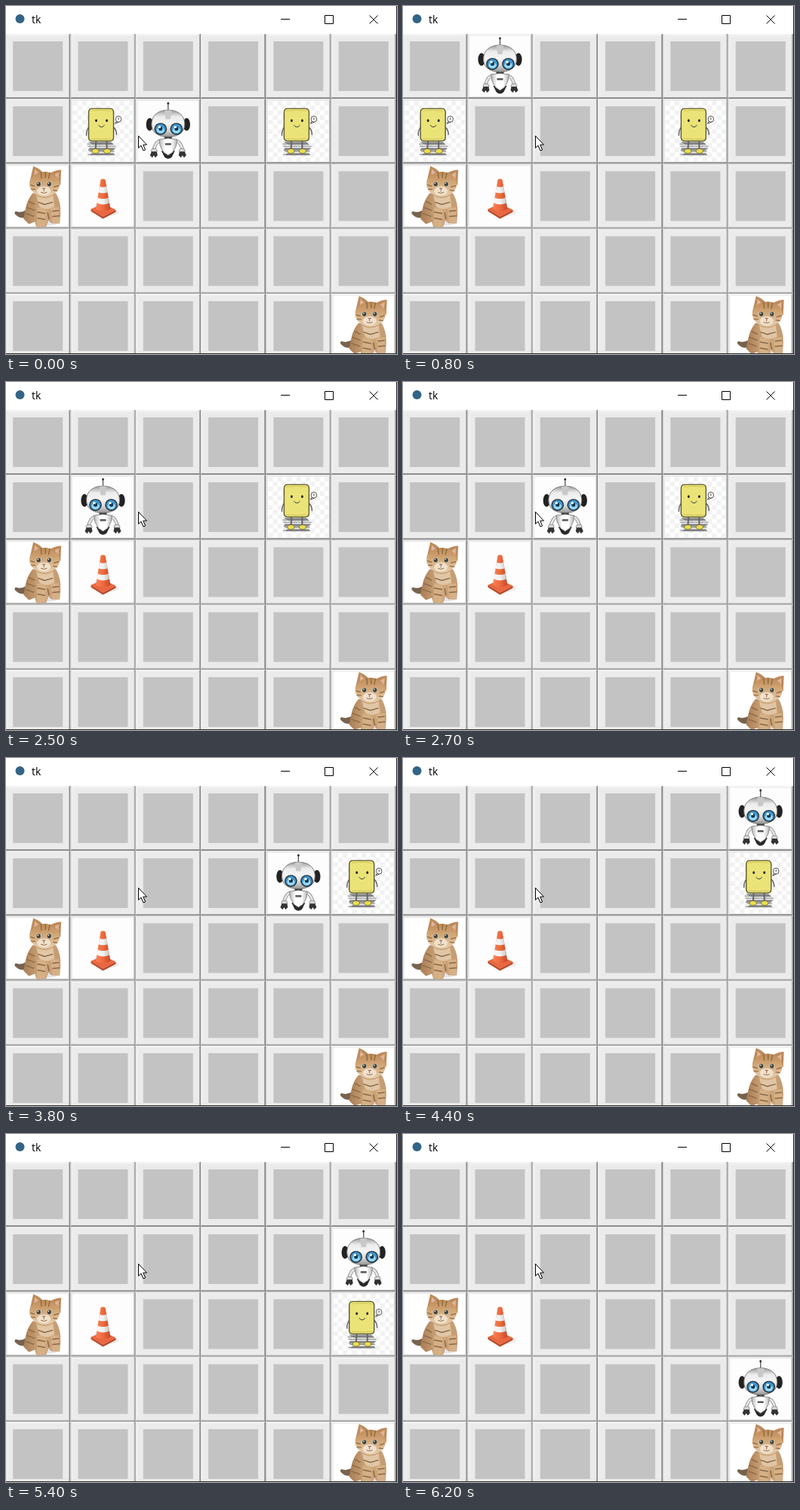
These frames come from a looping animation (518 px wide and 462 px high, 6300 ms). An HTML page with a canvas:

```html
<!DOCTYPE html>
<html lang="en">
<head>
<meta charset="utf-8">
<title>tk</title>
<style>
  html, body { margin: 0; width: 100%; height: 100%; overflow: hidden; background: #fff; }
  canvas { display: block; }
</style>
</head>
<body>
<canvas id="stage" width="518" height="462"></canvas>
<script>
const ctx = document.getElementById('stage').getContext('2d');
const LOOP = 6300, COLS = 6, ROWS = 5;
const cats = [[0, 2], [5, 4]], cone = [1, 2];
const STEPS = { L: [-1, 0], R: [1, 0], U: [0, -1], D: [0, 1] };
const moves = [
  [400, 'L'], [800, 'U'], [1300, 'L'], [1700, 'D'], [2200, 'R'], [2600, 'R'], [3100, 'R'],
  [3500, 'R'], [4000, 'U'], [4400, 'R'], [5000, 'D'], [5800, 'D'], [6200, 'D']
];
const same = (a, b) => a[0] === b[0] && a[1] === b[1];

// The robot pushes sponges; one pushed onto a cat disappears.
function stateAt(time) {
  let robot = [2, 1], sponges = [[1, 1], [4, 1]];
  for (const [when, key] of moves) {
    if (when > time) break;
    const step = pos => [pos[0] + STEPS[key][0], pos[1] + STEPS[key][1]];
    robot = step(robot);
    sponges = sponges.map(s => same(s, robot) ? step(s) : s)
                     .filter(s => !cats.some(c => same(c, s)));
  }
  return { robot, sponges };
}

function rect(color, x, y, w, h) {
  ctx.fillStyle = color;
  ctx.fillRect(x, y, w, h);
}
function shape(d, fill, stroke, width = 1) {
  const path = new Path2D(d);
  if (fill) { ctx.fillStyle = fill; ctx.fill(path); }
  if (stroke) { ctx.strokeStyle = stroke; ctx.lineWidth = width; ctx.stroke(path); }
}
function oval(x, y, rx, ry, fill, stroke, width = 1) {
  ctx.beginPath();
  ctx.ellipse(x, y, rx, ry, 0, 0, 7);
  ctx.fillStyle = fill;
  ctx.fill();
  if (stroke) { ctx.strokeStyle = stroke; ctx.lineWidth = width; ctx.stroke(); }
}
function gradient(x0, y0, x1, y1, ...colors) {
  const g = ctx.createLinearGradient(x0, y0, x1, y1);
  colors.forEach((c, i) => g.addColorStop(i / (colors.length - 1), c));
  return g;
}

function drawEmpty() {
  rect('#ebebeb', 0, 0, 81, 81);
  rect('#c3c3c3', 7, 7, 66, 66);
}

function drawRobot() {
  rect('#fdfdfd', 0, 0, 80, 80);
  shape('M40 12V4', null, '#555', 1.3);
  oval(40, 3, 1.4, 1.7, '#333');
  for (const side of [-1, 1]) {
    ctx.save();
    ctx.translate(40, 0);
    ctx.scale(side, 1);
    oval(24.5, 31, 4.6, 8.5, '#222');
    shape('M11 53Q16 54 19 64', null, '#888', 4.5);
    shape('M11 53Q16 54 19 64', null, '#e6e6e6', 2.8);
    oval(18.5, 66, 4, 3, '#d8d8d8', '#777', .7);
    shape('M15 67H22L24 72L21 75L19 72L17 75L14 72Z', '#333');
    ctx.restore();
  }
  shape('M35 46H45V52H35Z', '#3a3a3a');
  shape('M31 66H49L45 74Q40 79 35 74Z', '#292929');
  shape('M28 51Q40 48 52 51Q52 60 46 68L40 72L34 68Q28 60 28 51Z',
    gradient(28, 0, 52, 0, '#b5b5b5', '#fff', '#fff', '#b5b5b5'), '#777', .8);
  rect('#555', 36, 56, 8, 2.5);
  shape('M18 31C18 18 28 12 40 12S62 18 62 31C62 42 53 47.5 40 47.5S18 42 18 31Z',
    gradient(0, 12, 0, 47, '#999', '#ececec', '#f4f4f4', '#dadada', '#9a9a9a'), '#707070', .9);
  shape('M35 13Q40 11 45 13L43 24H37Z', '#c9c9c9');
  for (const x of [30, 51]) {
    oval(x, 37, 8.3, 8, '#27313a');
    oval(x, 37, 6.8, 6.6, '#3f95cd');
    oval(x, 38.8, 5, 4, '#9bdbf7');
    oval(x, 36.8, 2.6, 2.6, '#12344e');
    oval(x - 1.5, 34.5, 1.8, 1.6, '#fff');
  }
}

function drawSponge() {
  rect('#fff', 0, 0, 80, 80);
  for (let y = 0; y < 13; y++)
    for (let x = y % 2; x < 13; x += 2)
      rect('#f2f2f2', x * 6.2, y * 6.2, 6.2, 6.2);
  shape('M20 54H50L55 58H27ZM22 62H57L53 66H20ZM25 69H54L56 72H23Z', '#8c8c8c');
  shape('M19 57H53M20 60H57M22 67H55M20 71H52', null, '#777', 1);
  shape('M31 52L30 65M45 52V65', null, '#666', 2);
  for (const x of [30, 45.5]) oval(x, 66.5, 4.5, 3, '#ebdf50', '#6b652b', .8);
  shape('M21 35Q18 39 18 46M54 35Q58 38 58 45', null, '#666', 1.5);
  shape('M26 10H49Q54 10 54 15V48Q54 53 49 53H26Q21 53 21 48V15Q21 10 26 10Z',
    '#eae377', '#5d592f', 1.4);
  shape('M24 13Q37 11.5 51 13M24 50Q38 51 51 50', null, '#d2c85c', 1);
  oval(31, 26, 1.4, 1.8, '#222');
  oval(45, 26, 1.4, 1.8, '#222');
  shape('M34 32Q38 37 42 32', null, '#333', 1);
  oval(60.5, 24, 3.8, 4, '#fff', '#555', 1);
  shape('M58 27L56 30L61 28M60.5 22V25', null, '#444', 1);
}

function drawCat() {
  rect('#fff', 0, 0, 80, 80);
  oval(55, 74, 14, 5, '#e3e5e7');
  shape('M26 67Q18 72 10 64Q8 61 11 60Q17 63 25 58Z', '#77624e');
  shape('M33 36Q26 45 24 55L21 70L28 77L36 74L38 81H51L54 72L58 76H69L70 64Q71 48 64 36Z',
    gradient(20, 0, 70, 0, '#a67c54', '#cfa77c', '#c39b70'));
  shape('M38 39Q48 46 60 39L62 54Q51 60 42 54Z', '#e0c6a6');
  shape('M39 55L38 80H50L51 58ZM57 55L59 76H69L68 55Z', '#d5b087');
  shape('M28 47L36 51M25 55L36 59M24 63L35 67M40 48L49 51L60 48M39 61L50 63M39 69L50 71M59 60L68 59M59 67L69 66M53 62L55 71',
    null, '#8b6845', 1.5);
  shape('M29 22L34 0Q42 3 46 8L57 9Q64 5 71 5L70 25Z', '#bd8b5c');
  shape('M35 13L36 4L42 10ZM61 12L68 8L67 18Z', '#dfb59c');
  oval(49, 24, 20, 16.5, gradient(0, 7, 0, 40, '#bd8a57', '#d3a878', '#e6ceaf'));
  shape('M44 8L45 17M50 8V16M56 9L54 17M30 25L36 27M31 31L37 31M68 26L61 28M66 33L60 32',
    null, '#8f683f', 1.4);
  oval(48, 33, 9, 6, '#efe1cd');
  for (const x of [41, 55]) {
    oval(x, 24, 3.5, 3.3, '#e6d0ae');
    oval(x, 24, 2.7, 2.8, '#3c4644');
    oval(x - .8, 23, .8, .8, '#fff');
  }
  shape('M45.5 29H50.5L48 32Z', '#b27460');
  shape('M48 32V34M44 35Q48 37 52 35', null, '#8f6a4a', 1);
}

function drawCone() {
  rect('#fdfdfd', 0, 0, 80, 80);
  oval(47, 62, 14, 4, '#eeebe9');
  shape('M24 57L40 50L57 58L40 67Z', '#ea673f');
  shape('M24 57L40 67V70L24 60ZM40 67L57 58V61L40 70Z', '#bd4a2c');
  shape('M37 18Q40 16 43 18L50 57Q40 63 30.5 57Z',
    gradient(30, 0, 50, 0, '#f5845a', '#ee6b3e', '#c4482a'));
  shape('M35.5 27Q40 29 44.6 27L46 35Q40 37 34.2 35ZM33 42Q40 45 47.3 42L48.6 49Q40 53 31.8 49Z',
    gradient(32, 0, 49, 0, '#fafafa', '#f0f0ef', '#c3c3c3'));
}

function drawCell(col, row, sprite) {
  ctx.save();
  ctx.translate(.2 + 86.3 * col, 37.9 + 86.25 * row);
  rect('#696969', -1, -1, 86, 86);
  rect('#fff', -1, -1, 85, 85);
  rect('#a0a0a0', 0, 0, 84, 84);
  rect('#f0f0f0', 0, 0, 83, 83);
  ctx.translate(2, 2);
  sprite();
  ctx.restore();
}

function drawTitleBar() {
  rect('#fff', 0, 0, 518, 37);
  oval(18.5, 17, 6, 6, '#316487');
  ctx.fillStyle = '#000';
  ctx.font = '14px "Open Sans", sans-serif';
  ctx.fillText('tk', 34, 23);
  rect('#000', 364, 17, 12, 1);
  shape('M422.5 12.5H433.5V23.5H422.5ZM481.5 12.5L492.5 23.5M492.5 12.5L481.5 23.5', null, '#000');
}

function draw(time) {
  const { robot, sponges } = stateAt(time);
  rect('#f0f0f0', 0, 0, 518, 462);
  for (let row = 0; row < ROWS; row++)
    for (let col = 0; col < COLS; col++) {
      const here = pos => same(pos, [col, row]);
      const sprite = here(robot) ? drawRobot : sponges.some(here) ? drawSponge
        : cats.some(here) ? drawCat : here(cone) ? drawCone : drawEmpty;
      drawCell(col, row, sprite);
    }
  drawTitleBar();
  rect('#222', 517, 0, 1, 462);
  rect('#333', 0, 461, 518, 1);
  shape('M175.5 172.5V188.5L179 185.2L182 192L184.6 191L181.8 184.2H186.5Z', '#fff', '#000');
}

function tick() {
  draw(performance.now() % LOOP);
  requestAnimationFrame(tick);
}
tick();
</script>
</body>
</html>
```
